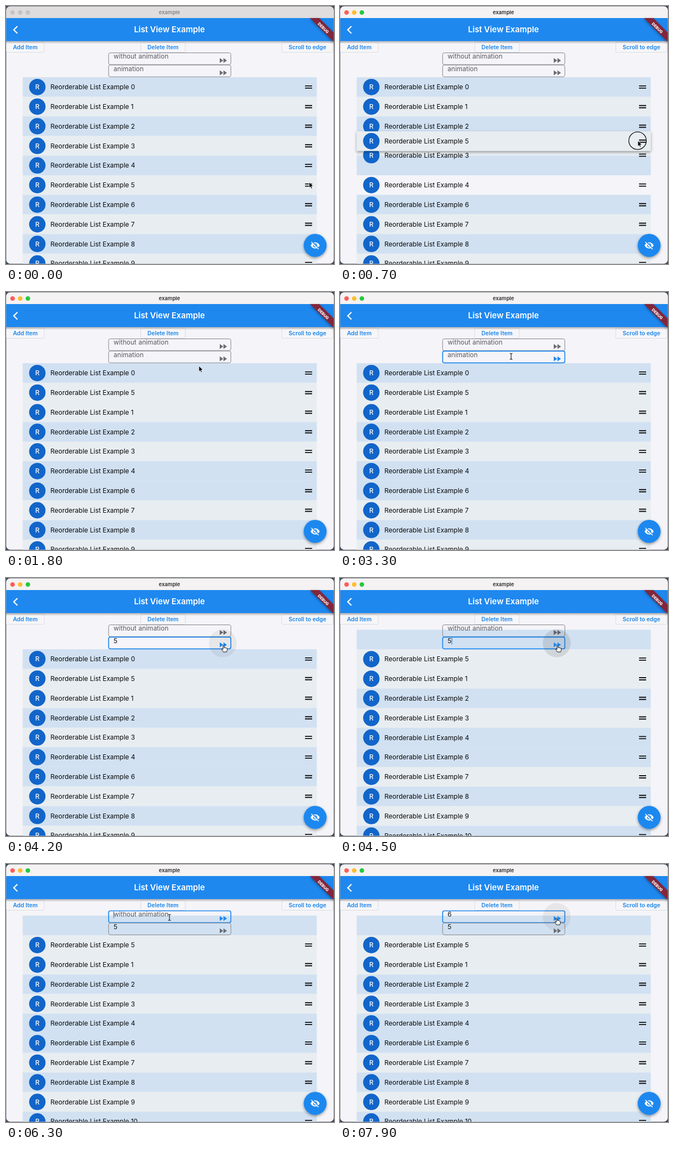
Recreate the animation shown at these times as an HTML page. Size 600 px wide and 471 px high, loop 8000 ms.

```html
<!DOCTYPE html>
<html lang="en">
<head>
<meta charset="utf-8">
<title>List View Example</title>
<style>
  html, body { margin: 0; width: 100%; height: 100%; overflow: hidden; background: #3f4a57; }
  svg { display: block; width: 100%; height: 100%; font-family: Inter, "Open Sans", sans-serif; }
  .mid { text-anchor: middle; }
  .btn rect { fill: #f6f6f9; stroke: #dcdde2; }
  .btn text { fill: #1c86ea; font-size: 10.4px; font-weight: 600; text-anchor: middle; }
  .row text { font-size: 12px; fill: #080808; }
  .row .mid { font-weight: 500; fill: #fff; }
  .field text { font-size: 12px; }
</style>
</head>
<body>
<svg viewBox="0 0 600 471">
  <defs>
    <clipPath id="win"><rect x=".5" y=".8" width="599" height="469.6" rx="7"/></clipPath>
    <clipPath id="list"><rect y="130" width="600" height="341"/></clipPath>
    <linearGradient id="fade" x2="0" y2="1">
      <stop stop-opacity=".28"/><stop offset="1" stop-opacity="0"/>
    </linearGradient>
    <filter id="lift" x="-20%" y="-50%" width="140%" height="220%">
      <feDropShadow dx="0" dy="2" stdDeviation="2.5" flood-opacity=".4"/>
    </filter>
  </defs>
  <g clip-path="url(#win)">
    <rect width="600" height="471" fill="#f5f4f8"/>
    <g id="stripes"></g>
    <g id="rows" clip-path="url(#list)"></g>

    <g id="buttons"></g>
    <g id="fields"></g>
    <rect y="64" width="600" height="5" fill="url(#fade)"/>

    <rect id="titlebar" width="600" height="22.5"/>
    <g id="lights"></g>
    <text id="caption" class="mid" x="299" y="15.3" font-size="9.5" font-weight="600">example</text>

    <rect y="22" width="600" height="42" fill="#1e88ef"/>
    <path d="M20.800 37l-6.500 6.500 6.500 6.500" fill="none" stroke="#fff" stroke-width="2.300"/>
    <text class="mid" x="299" y="48.300" font-size="14.8" font-weight="600" fill="#fff">List View Example</text>
    <path d="M556 22h17l27 27v17z" fill="#82263a" filter="url(#lift)"/>
    <text class="mid" transform="translate(580.5 40) rotate(45)" y="2.600" font-size="7.200" font-weight="800" fill="#fff">DEBUG</text>

    <circle cx="565.500" cy="437" r="21" fill="#1e88ef" filter="url(#lift)"/>
    <g transform="translate(556.500 428) scale(.75)">
      <path d="M1 12C5 2 19 2 23 12C19 22 5 22 1 12z" fill="#fff"/>
      <circle cx="12" cy="12" r="4" fill="#fff" stroke="#1e88ef" stroke-width="2"/>
      <path d="M4 2.500L22 20.500" stroke="#1e88ef" stroke-width="2.400"/>
      <path d="M2.600 3.600L20.400 21.400" stroke="#fff" stroke-width="1.900"/>
    </g>

    <circle id="ring" r="16" fill="none" stroke="#111" stroke-width="1.300"/>
    <g id="cursor">
      <path d="M0 0v10.500l2.400-2.200 1.600 3.700 1.800-.8-1.600-3.600h3.300z" fill="#000" stroke="#fff" stroke-width=".8"/>
      <path d="M-2.500-5.500Q0-5.500 0-4Q0-5.500 2.500-5.500M0-4V4M-2.500 5.500Q0 5.500 0 4Q0 5.500 2.500 5.500" fill="none" stroke="#111" stroke-width="1.100"/>
      <path d="M-1 1Q0-.8 1 1V5Q2.300 3.800 3 5.200Q4.400 4.400 5 5.700Q6.600 5 6.600 7V9Q6 11 5.500 12.500H-.3Q-1.500 10.500-3.800 7.500Q-3.300 5.800-1 8z" fill="#fff" stroke="#111"/>
    </g>
  </g>
</svg>
<script>
const $ = id => document.getElementById(id);
const LOOP = 8000, STEP = 35.8, TOP = 130, BLUE = '#1e88ef';
const PRESS = 250, RELEASE = 1250, DROPPED = 1500;
const FOCUS_2 = 2750, TYPE_5 = 3450, JUMP = 4250, FOCUS_1 = 6100, TYPE_6 = 7200;
const order = [0, 5, 1, 2, 3, 4, 6, 7, 8, 9, 10];
const clicks = [[PRESS, RELEASE], [FOCUS_2, FOCUS_2 + 100], [JUMP, JUMP + 100], [FOCUS_1, FOCUS_1 + 100]];
// time, x, y of the pointer tip
const path = [
  [0, 554.5, 321.5], [PRESS, 553, 326], [600, 547, 262], [1000, 538.5, 198.2], [RELEASE, 537, 188],
  [1400, 520, 184], [1800, 353, 135], [2300, 313, 117.5], [3600, 313, 117.5], [4150, 398, 122.5],
  [5200, 398, 122.5], [5800, 299, 97.5], [7250, 299, 97.5], [7650, 396.500, 98.500], [LOOP, 396.500, 98.500]
];

const part = (t, from, length) => Math.min(1, Math.max(0, (t - from) / length));
const smooth = p => p * p * (3 - 2 * p);
const show = (el, on) => el.setAttribute('opacity', +on);
const move = (el, x, y) => el.setAttribute('transform', `translate(${x} ${y})`);

const rowBody = id => `<circle cx="57.300" r="15" fill="#1265c9"/>
  <text class="mid" x="57.300" y="4.300">R</text>
  <text x="81.200" y="4.200">Reorderable List Example ${id}</text>
  <path d="M547-2h13M547 2h13" stroke="#111" stroke-width="1.900"/>`;
const stripe = id => `<rect x="30.500" width="538" height="${STEP}" fill="${id % 2 ? '#e8edf1' : '#d1e1f2'}"/>`;

$('stripes').innerHTML = order.map(stripe).join('');
// the dragged row comes last so that it lies on top
const stack = [...order.filter(id => id !== 5), 5];
$('rows').innerHTML = stack.map(id => `<g class="row">${id === 5
  ? `<g id="card" transform="translate(0 ${-STEP / 2})" filter="url(#lift)">${stripe(5)}</g>` : ''}${rowBody(id)}</g>`).join('');
$('buttons').innerHTML = [['Add Item', .5, 69.500], ['Delete Item', 246.500, 81.500], ['Scroll to edge', 504.500, 94]]
  .map(([label, x, w]) => `<g class="btn"><rect x="${x}" y="66" width="${w}" height="18.500" rx="2"/>
    <text x="${x + w / 2}" y="79.200">${label}</text></g>`).join('');
$('fields').innerHTML = [85.500, 107.800].map(y => `<g class="field" transform="translate(188 ${y})">
  <rect x="-.3" width="223.600" height="21.500" rx="3" fill="none"/>
  <circle cx="208.500" cy="11.300" r="25.500"/>
  <text x="8.800" y="10.700"></text>
  <path d="M203 9.600l6.400 4.500-6.400 4.500zm6.800 0l6.400 4.500-6.400 4.500z"/>
  <rect y="1.200" width="1.200" height="12.500" fill="${BLUE}"/></g>`).join('');
$('lights').innerHTML = [12, 26, 40].map(x => `<circle cx="${x}" cy="11.900" r="4.200"/>`).join('');

function pointer(t) {
  const i = path.findIndex(k => k[0] > t), [a, b] = [path[i - 1], path[i]];
  const p = part(t, a[0], b[0] - a[0]);
  return [a[1] + (b[1] - a[1]) * p, a[2] + (b[2] - a[2]) * p];
}

function drawList(t, pointerY) {
  const scroll = STEP * (1 - (1 - part(t, JUMP, 310)) ** 3);
  const dragging = t >= PRESS && t < DROPPED;
  const slotY = slot => TOP + STEP * (slot + .5);

  [...$('stripes').children].forEach((el, i) => {
    const id = order[i];
    el.setAttribute('y', TOP + STEP * (t < DROPPED ? id : i) - scroll);
    show(el, !(id === 5 && dragging));
  });
  stack.forEach((id, i) => {
    let y = slotY(t < DROPPED ? id : order.indexOf(id));
    if (id === 5 && dragging) {
      const held = pointerY + .8;
      y = t < RELEASE ? held : 188.800 + (slotY(1) - 188.800) * smooth(part(t, RELEASE, DROPPED - RELEASE));
    } else if (id > 0 && id < 5 && dragging) {
      y += STEP * smooth(part(t, 1060 - 160 * id, 250));
    }
    move($('rows').children[i], 0, y - scroll);
  });
  show($('card'), dragging);
}

function drawField(index, t, { focused, value, hint, since, hover }) {
  const [box, halo, text, icon, caret] = $('fields').children[index].children;
  box.setAttribute('stroke', focused ? BLUE : '#85868b');
  box.setAttribute('stroke-width', focused ? 1.700 : 1);
  icon.setAttribute('fill', focused ? BLUE : '#6c6c72');
  text.textContent = value || hint;
  text.setAttribute('fill', value ? '#111' : '#5a5a5e');
  caret.setAttribute('x', value ? 16 : 8.400);
  show(caret, focused && (t - since) % 1000 < 500);
  halo.setAttribute('opacity', hover);
}

function draw(t) {
  const [x, y] = pointer(t);
  drawList(t, y);

  const active = t >= PRESS;
  $('titlebar').setAttribute('fill', active ? '#f4f2f3' : '#dfdddd');
  $('caption').setAttribute('fill', active ? '#2e2e2e' : '#858383');
  ['#ff5f57', '#febc2e', '#28c840'].forEach((c, i) =>
    $('lights').children[i].setAttribute('fill', active ? c : '#c6c3c3'));

  const inField = x > 188 && x < 411 && y > 85 && y < 130;
  const onIcon = inField && x > 380;
  const splash = t >= JUMP ? .04 * (1 - part(t, 4550, 250)) : 0;
  const halo = on => onIcon && on ? .06 + splash : 0;
  drawField(0, t, {
    focused: t >= FOCUS_1, value: t >= TYPE_6 ? '6' : '', hint: 'without animation',
    since: t >= TYPE_6 ? TYPE_6 : FOCUS_1, hover: halo(y < 107.500)
  });
  drawField(1, t, {
    focused: t >= FOCUS_2 && t < FOCUS_1, value: t >= TYPE_5 ? '5' : '', hint: 'animation',
    since: t >= TYPE_5 ? TYPE_5 : FOCUS_2, hover: halo(y >= 107.500)
  });

  const shape = onIcon ? 2 : inField ? 1 : 0;
  [...$('cursor').children].forEach((el, i) => show(el, i === shape));
  move($('cursor'), x, y);
  move($('ring'), x - .5, y);
  show($('ring'), clicks.some(([from, to]) => t >= from && t < to));
}

function tick() {
  draw(performance.now() % LOOP);
  requestAnimationFrame(tick);
}
tick();
</script>
</body>
</html>
```
